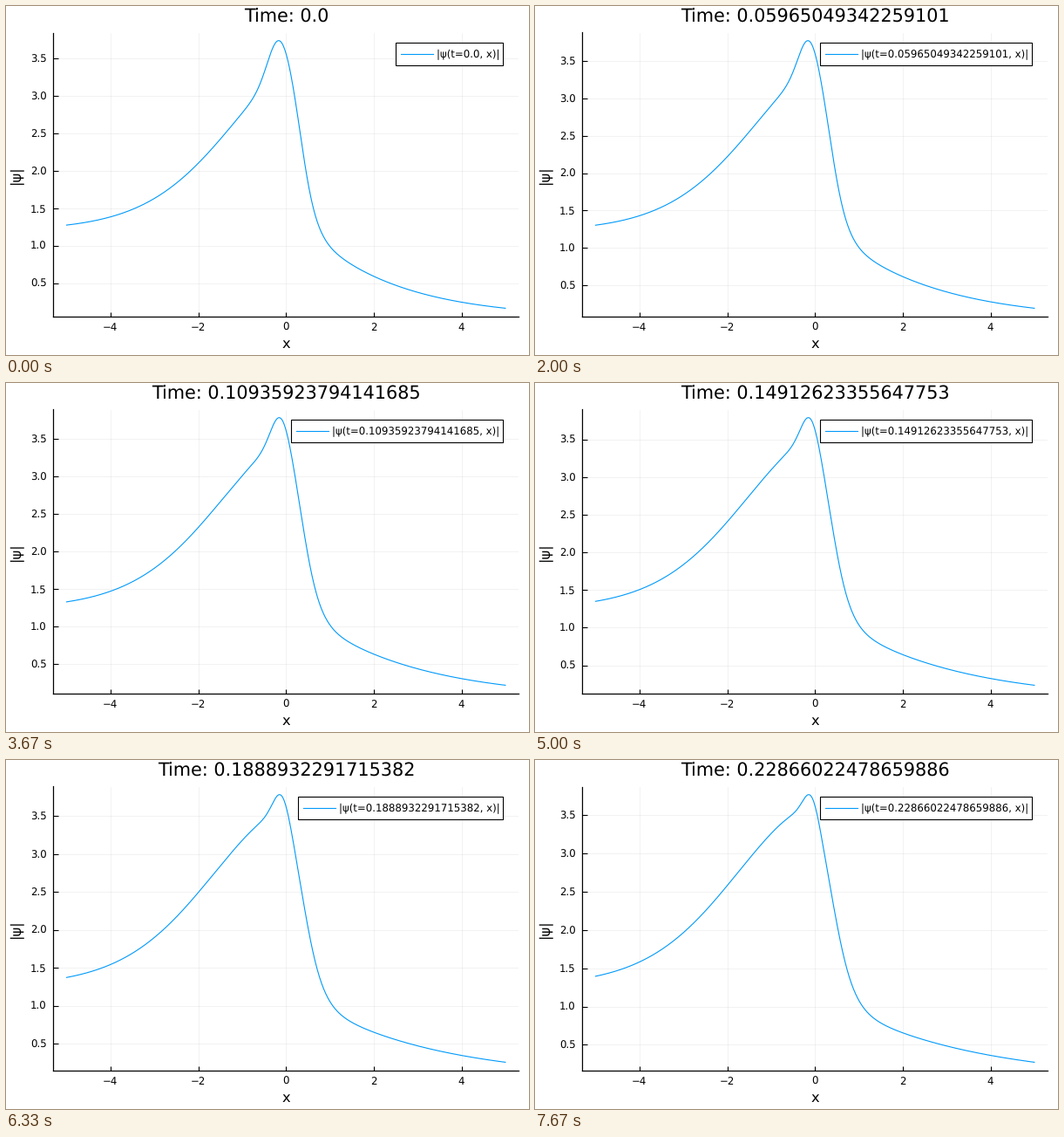
A matplotlib script that plays this animation: 600x400 px, repeating every 8000 ms.

```python
import math

import matplotlib.pyplot as plt
import numpy as np
from matplotlib.animation import FuncAnimation
from matplotlib.patches import Rectangle
from matplotlib.ticker import MultipleLocator
from matplotlib.transforms import Affine2D

W, H, DPI = 600, 400, 100
LOOP_MS, STEPS, TICK_MS = 8000, 24, 40
LEAD_MS = 30  # a step due within a tick is shown at the tick's start
LEFT, RIGHT, TOP, BOTTOM = 54.4, 588, 30.5, 355.6
BLUE = "#009afa"
PT = 72 / DPI  # points per pixel

plt.rcParams.update({"font.family": "DejaVu Sans", "text.hinting": "none"})
X = np.linspace(-5, 5, 600)


def logistic(u):
    return 1 / (1 + np.exp(-u))


def amplitude(t):
    """Rising front on the left, decaying tail on the right, peak between."""
    front = 1.2 + 0.27 * t + 3 * logistic(0.94 * (X + 1.10 + 2.8 * t))
    tail = 0.034 + 1.47 * np.exp(-t - 0.486 * math.exp(-1.86 * t) * X)
    blend = logistic((5.9 - 7 * t) * (0.325 + 0.18 * t - X))
    offset = (X + 0.17 - 0.4 * t) / (0.245 - 0.3 * t)
    peak = (0.51 - 0.83 * t) * np.exp(-offset**2 / 2)
    return tail + (front - tail) * blend + peak


fig = plt.figure(figsize=(W / DPI, H / DPI), dpi=DPI, facecolor="white")
pixels = Affine2D().scale(1 / W, -1 / H).translate(0, 1) + fig.transFigure

ax = fig.add_axes([LEFT / W, 1 - BOTTOM / H, (RIGHT - LEFT) / W, (BOTTOM - TOP) / H])
ax.set_xlim(-5.3, 5.3)
ax.xaxis.set_major_locator(MultipleLocator(2))
ax.yaxis.set_major_locator(MultipleLocator(0.5))
ax.yaxis.set_major_formatter("{x:.1f}")
ax.spines[["top", "right"]].set_visible(False)
ax.spines[["left", "bottom"]].set_linewidth(0.9)
ax.set_axisbelow(True)
ax.grid(color="black", alpha=0.07, linewidth=0.5)
ax.tick_params(direction="in", length=5.5 * PT, width=0.8, labelsize=11.8 * PT)
ax.tick_params(axis="x", pad=7.5 * PT)
ax.tick_params(axis="y", pad=7.5 * PT)


def label(x, y, text, size, **style):
    return ax.text(x, y, text, fontsize=size * PT, transform=pixels, **style)


title = label(321.5, 18.5, "", 20.8, ha="center", va="baseline")
label(321.5, 391.5, "x", 16.2, ha="center", va="baseline")
label(11.5, 193, "|ψ|", 16.2, ha="center", va="center", rotation=90)

curve, = ax.plot([], [], color=BLUE, linewidth=0.8)
box = Rectangle((0, 42), 1, 26, facecolor="white", edgecolor="black",
                linewidth=0.8, transform=pixels, zorder=4)
ax.add_patch(box)
sample, = ax.plot([0, 1], [55, 55], color=BLUE, linewidth=0.8,
                  transform=pixels, zorder=5)
legend = label(566.3, 59, "", 11.78, ha="right", va="baseline", zorder=5)


def draw(tick):
    step = int((tick * TICK_MS + LEAD_MS) * STEPS / LOOP_MS)
    # extended precision keeps the printed digits correctly rounded
    time = float(np.longdouble(math.tau) * step / 632)

    y = amplitude(time)
    low, high = y.min(), y.max()
    pad = 0.03 * (high - low)
    ax.set_ylim(low - pad, high + pad)
    curve.set_data(X, y)

    title.set_text(f"Time: {time}")
    legend.set_text(f"|ψ(t={time}, x)|")
    extent = legend.get_window_extent().transformed(pixels.inverted())
    left = round(extent.x0 - 46.7)
    box.set_x(left)
    box.set_width(570 - left)
    sample.set_xdata([left + 6, left + 42.5])
    return curve, title, legend, box, sample


anim = FuncAnimation(fig, draw, frames=LOOP_MS // TICK_MS, interval=TICK_MS,
                     repeat=True, repeat_delay=0, blit=False)
plt.show()
```
